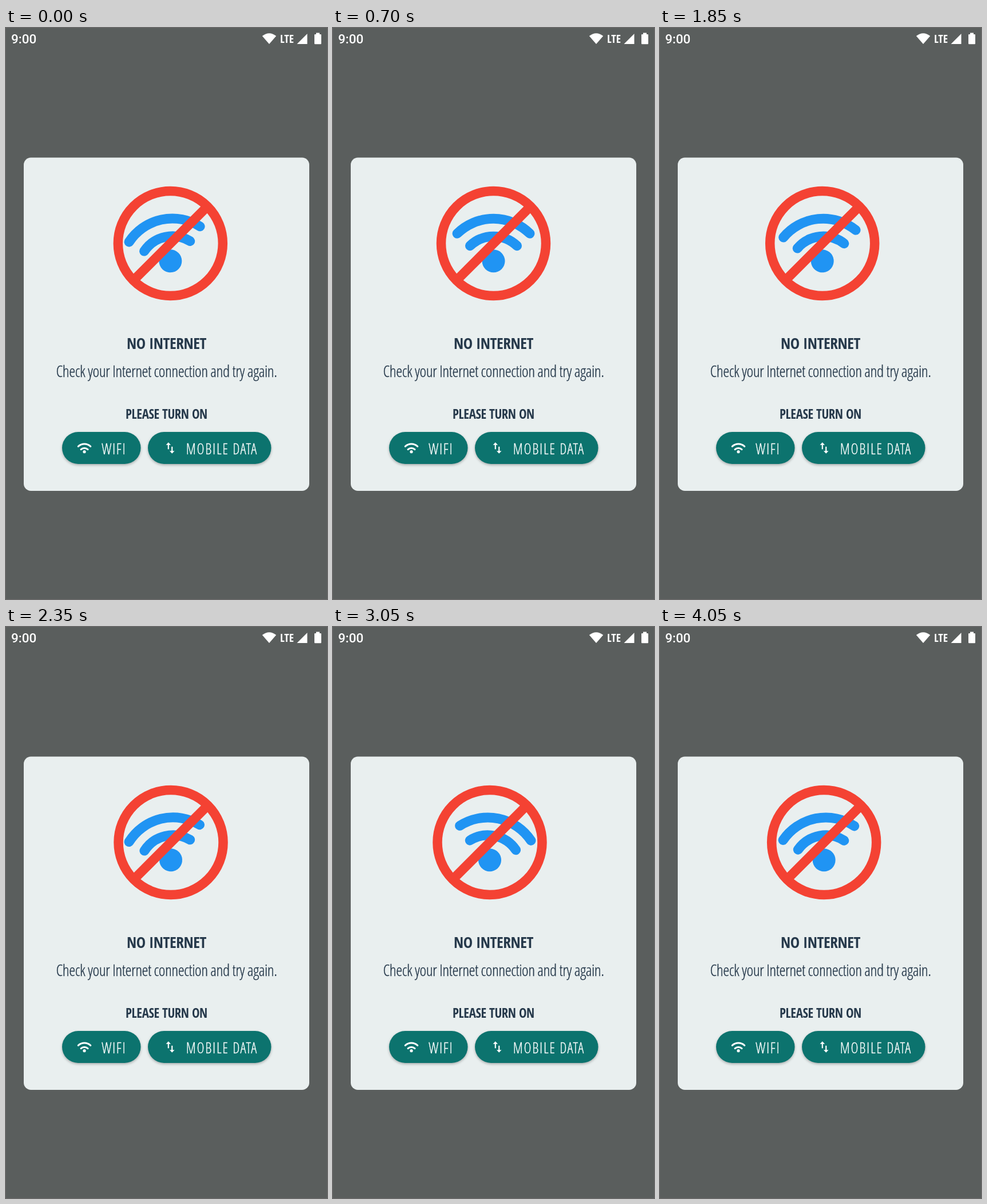
These frames come from a looping animation (561 by 998 pixels, 4100 ms). An HTML page:

```html
<!DOCTYPE html>
<html lang="en">
<head>
<meta charset="utf-8">
<title>No internet dialog</title>
<style>
  html, body { margin: 0; width: 100%; height: 100%; overflow: hidden; background: #5a5e5d; }
  svg { display: block; width: 100%; height: 100%; }
  .narrow { font-stretch: 75%; text-anchor: middle; }
  .clock { font: 500 22.5px Roboto, sans-serif; }
  .line { fill: none; stroke-linecap: round; }
  .button { fill: #0c736e; filter: drop-shadow(0 2px 2px rgba(0, 0, 0, .28)); }
</style>
</head>
<body>
<svg viewBox="0 0 561 998">
  <rect width="561" height="998" fill="#5a5e5d"/>

  <g id="status" fill="#fff">
    <text class="clock" x="9" y="27">9:00</text>
    <path d="M447.8 14Q460 4.500 472.200 14L460 28Z"/>
    <path d="M526.500 10V28H508.500Z"/>
    <path d="M542 8.500H548V11H550Q551 11 551 12V27Q551 28.300 550 28.300H540Q539 28.300 539 27V12Q539 11 540 11H542Z"/>
  </g>

  <rect x="31" y="226.500" width="499" height="582.500" rx="12.500" fill="#e9efef"/>

  <g id="sign">
    <g id="wifi" class="line" stroke="#2094f3" stroke-width="17">
      <path d="M217 359.300A90.500 90.500 0 0 1 344 359.300"/>
      <path d="M239.500 380.700A59.300 59.300 0 0 1 321.500 380.700"/>
      <circle cx="280.500" cy="407.300" r="20" fill="#2094f3" stroke="none"/>
    </g>
    <g fill="none" stroke="#f44233" stroke-width="16.500">
      <circle cx="280.500" cy="376.500" r="91.500"/>
      <path d="M344.500 312.500L216.500 440.500"/>
    </g>
  </g>

  <rect class="button" x="98" y="706" width="137.500" height="56" rx="28"/>
  <rect class="button" x="248" y="706" width="215.500" height="56" rx="28"/>
  <g class="line" stroke="#fff" stroke-width="3">
    <path d="M126.200 731.300A16 16 0 0 1 147.800 731.300"/>
    <path d="M131 736.600A9.200 9.200 0 0 1 143 736.600"/>
    <circle cx="137" cy="740.700" r="2.600" fill="#fff" stroke="none"/>
  </g>
  <g fill="#fff" transform="translate(287 734) scale(1.07)">
    <path id="arrow" d="M-3 -9L1 -5H-2V2H-4V-5H-7Z"/>
    <use href="#arrow" transform="rotate(180)"/>
  </g>
  <g id="labels"></g>
</svg>
<script>
  const INK = "#26394b", WHITE = "#fff";
  const FAMILIES = ["Open Sans Condensed", "Open Sans", "Noto Sans", "Roboto Condensed", "Roboto"];
  const STEP = 50, LOOP = 4100, SWING = 2050, CENTRE_TIME = 700;
  const SHIFT = 7.9, TILT = 14.3;
  const byId = id => document.getElementById(id);

  // Centre of the capitals, largest size and the room each label has.
  const labels = [
    { text: "NO INTERNET", x: 280.5, y: 551.5, size: 32, room: 139, weight: 700, spacing: -.015 },
    { text: "Check your Internet connection and try again.", x: 280.5, y: 600.5, size: 28, room: 386, weight: 300, spacing: -.015 },
    { text: "PLEASE TURN ON", x: 280.5, y: 675, size: 24.5, room: 143, weight: 700, spacing: -.015 },
    { text: "WIFI", x: 188.8, y: 736, size: 25, room: 44, weight: 300, spacing: .07, fill: WHITE },
    { text: "MOBILE DATA", x: 377.3, y: 736, size: 25, room: 126, weight: 300, spacing: .07, fill: WHITE },
    { text: "LTE", x: 491, y: 18.8, size: 19.5, room: 27, weight: 400, spacing: 0, fill: WHITE }
  ];

  // Use the narrowest family at hand, and a smaller size where the label would overflow.
  function addLabel({ text, x, y, size, room, weight, spacing, fill = INK }) {
    const node = document.createElementNS("http://www.w3.org/2000/svg", "text");
    const { style } = node;
    const widthIn = family => {
      style.fontFamily = `"${family}", sans-serif`;
      return node.getComputedTextLength();
    };
    node.textContent = text;
    node.setAttribute("class", "narrow");
    node.setAttribute("x", x);
    node.setAttribute("fill", fill);
    style.fontSize = size + "px";
    style.fontWeight = weight;
    style.letterSpacing = spacing + "em";
    if (weight === 300) {
      style.stroke = fill;
      style.strokeWidth = .3;
    }
    byId("labels").append(node);

    const widths = FAMILIES.map(widthIn);
    const width = Math.min(...widths);
    const fitted = size * Math.min(1, room / width);
    style.fontFamily = `"${FAMILIES[widths.indexOf(width)]}", sans-serif`;
    style.fontSize = fitted + "px";
    node.setAttribute("y", y + fitted * .357);
  }

  // Cubic ease-in-out with handles at .42 and .58.
  function easeInOut(x) {
    let low = 0, high = 1, s = .5;
    for (let i = 0; i < 24; i++) {
      s = (low + high) / 2;
      const at = 3 * s * (1 - s) * (.42 * (1 - s) + .58 * s) + s ** 3;
      if (at < x) low = s; else high = s;
    }
    return s * s * (3 - 2 * s);
  }

  function swing(time) {
    const phase = ((time - CENTRE_TIME) / SWING + 1.25) % 1;
    const half = phase < .5 ? phase * 2 : 2 - phase * 2;
    return 1 - 2 * easeInOut(half);
  }

  function draw(time) {
    const sway = swing(Math.floor(time % LOOP / STEP) * STEP);
    byId("sign").setAttribute("transform", `translate(${sway * SHIFT} 0)`);
    byId("wifi").setAttribute("transform", `rotate(${-sway * TILT} 280.5 407.3)`);
  }

  labels.forEach(addLabel);
  const start = performance.now();
  function tick() {
    draw(performance.now() - start);
    requestAnimationFrame(tick);
  }
  tick();
</script>
</body>
</html>
```
